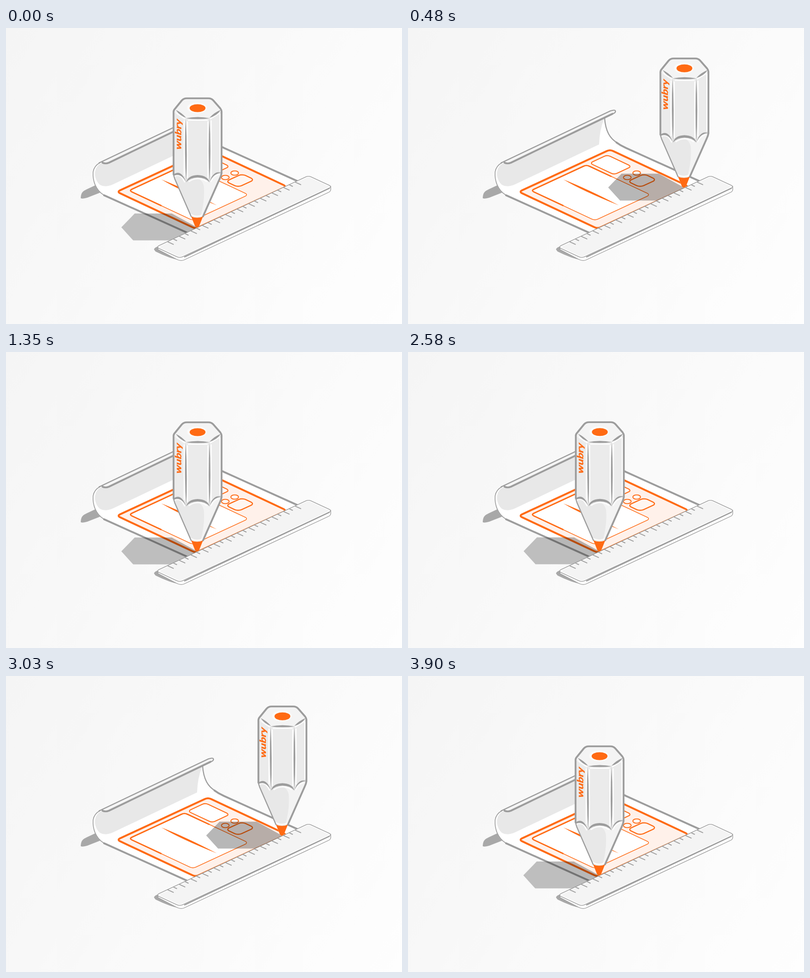
These frames come from a looping animation (800 by 600 pixels, 4.35 s). An HTML page:

```html
<!DOCTYPE html>
<html lang="en">
<head>
<meta charset="utf-8">
<title>Pencil and ruler</title>
<style>
  html, body { margin: 0; height: 100%; overflow: hidden; }
  body { background: linear-gradient(120deg, #f5f5f5, #fefefe); }
  svg { display: block; width: 100%; height: 100%; }
  .line { fill: none; stroke: #9c9c9c; stroke-linecap: round; stroke-linejoin: round; }
  .ink { fill: none; stroke: #ff6a13; stroke-linejoin: round; }
  .white { fill: none; stroke: #fff; stroke-linecap: round; stroke-linejoin: round; }
  .dark { fill: #9c9c9c; }
  .orange { fill: #ff6a13; }
  .ink path, rect { vector-effect: non-scaling-stroke; }
  text { font: italic 700 23px Lato, "Open Sans", sans-serif; stroke: #ff6a13; stroke-width: .5; }
</style>
</head>
<body>
<svg viewBox="0 0 800 600">
  <defs>
    <path id="sheet" d="M397 181C399 215 416 231 440 243L588 310L366 415L198 339C180 330 175 308 176 292Q178 279 192 272Z"/>
    <clipPath id="onSheet"><use href="#sheet"/></clipPath>
    <path id="shadow" d="M260 376H335L386 404L360 430.500H257L233 404Z"/>
  </defs>

  <g id="paper">
    <path fill="#a8a8a8" d="M151 344C152 333 155 331 163 327L180 319Q186 329 192 333L164 344Q154 347 151 345Z"/>
    <use href="#sheet" fill="#fff"/>
    <path fill="#e8e8e8" d="M205 276L396 184Q387 207 386 236L216 317Q200 324 190 318C177 308 175 281 193 274Z"/>
    <path fill="#f5f5f5" d="M186 274L409 168Q418 165 419 168Q420 172 413 174L209 273Q200 277 193 273Z"/>
    <path class="line" stroke-width="1.500" d="M198 339C180 328 175 308 176 292Q178 279 190 273"/>
    <path class="line" stroke-width="2.200" d="M188 273.500L409 168Q418 165 419 168Q420 172 413 174"/>
    <path class="line" stroke-width="3.700" d="M413 174L208 273Q201 276 195 273"/>
    <path class="line" stroke-width="3.600" d="M198 339L366 415M421 232Q429 238 440 243L588 310"/>
    <path class="line" stroke-width="2.200" d="M397 181C399 210 408 224 423 233"/>
    <g class="ink" transform="matrix(1 .47 1 -.465 224 332)">
      <rect width="159" height="184" rx="6" fill="#fff1ea" stroke-width="3.800"/>
      <rect x="9.500" y="15" width="129" height="112" rx="6" fill="#fff" stroke-width="1.400"/>
      <path d="M75 15H15.500Q9.500 15 9.500 21V121Q9.500 127 15.500 127H60" stroke-width="2.600"/>
      <rect x="9" y="134" width="49.500" height="35.500" rx="6" fill="#fff" stroke-width="1.900"/>
      <rect x="87" y="133" width="25" height="33" rx="7" fill="#fff6f1" stroke-width="2.200"/>
    </g>
    <g class="ink" stroke-width="1.800">
      <ellipse cx="462" cy="294" rx="7.800" ry="4.400" fill="#fff6f1"/>
      <ellipse cx="443" cy="303" rx="7.800" ry="4.400" fill="#fff6f1"/>
    </g>
    <path class="orange" d="M314 307Q364 327 426 359.500Q352 330 314 307Z"/>
  </g>

  <use class="moving" href="#shadow" fill-opacity=".24"/>
  <g clip-path="url(#onSheet)">
    <use class="moving" href="#shadow" fill-opacity=".06"/>
  </g>

  <g id="ruler">
    <path fill="#a8a8a8" d="M299 449Q299 446 306 443L352 471Q330 467 302 453Z"/>
    <path class="line" style="fill:#fff" stroke-width="1.300" d="M307 444V449L345 469Q353 473 360 470L652 333Q656 331 656 327V321L600 310Z"/>
    <g transform="matrix(1 .47 1 -.47 303 444)">
      <rect width="48" height="308" rx="6" fill="#fff" stroke="#9c9c9c" stroke-width="1.400"/>
      <rect x="2.500" y="2.500" width="43" height="303" rx="5" fill="#f4f4f4"/>
    </g>
    <path class="line" stroke-width="2.300" d="M361 464L653 325"/>
    <path class="line" stroke-width="1.900" id="ticks"/>
  </g>

  <g class="moving">
    <path fill="#f3f3f3" d="M338 168L355 147Q359 142 365 142H409Q415 142 419 147L436 168V298L398 382L390 402Q386 407 382 402L374 382L338 299Z"/>
    <path fill="#e8e8e8" d="M340 303Q352 295 364 313Q372 304 386 304Q400 310 400 326C401 348 397 367 393 383H374Z"/>
    <path class="white" stroke-width="2" d="M373 378Q386 385 399 378"/>
    <path fill="#ebebeb" d="M340 171L363 184V310Q354 290 340 296ZM364 184H411V311Q387 290 364 311ZM411 184L434 170V293Q419 291 411 311Z"/>
    <path fill="#f4f4f4" d="M342 167L358 147Q361 144 366 144H408Q413 144 416 147L433 167L411 182H364Z"/>
    <path class="white" stroke-width="2.200" d="M345 173L361 184M368 187H407M413 184L431 173M366.500 190V303M408 190V303M414.500 188V300M432.500 174V289M360 188V299M343 298Q352 294 361 312M370 311Q387 300 405 311M414 311Q420 299 430 297"/>
    <path class="dark" d="M343 166Q354 171 364 182Q351 178 343 166ZM434 166Q421 171 411 182Q426 178 434 166ZM363 183Q387 178 412 183Q387 186 363 183Z"/>
    <path class="dark" d="M363 183Q367 247 364 313Q360 247 363 183ZM411 183Q415 247 411 313Q408 247 411 183Z"/>
    <path class="dark" d="M364 313Q367 299 387 298Q408 299 411 313Q403 303 387 303Q372 303 364 313ZM338 297Q354 285 364 313Q353 292 338 300ZM411 313Q419 287 436 294Q420 293 411 313Z"/>
    <ellipse cx="386" cy="162" rx="20" ry="11" fill="#fbfbfb"/>
    <ellipse class="orange" cx="387" cy="162.500" rx="16" ry="8"/>
    <path class="line" stroke-width="3.600" d="M338.500 297V171Q338 167 342 163L355 147Q359 142.500 365 142.500H409Q415 142.500 419 147L433 163Q436 167 435.500 171V294Q435 299 432 305L398 382"/>
    <path class="line" stroke-width="2.200" d="M338.500 296Q339 301 341 306L374 382"/>
    <path class="orange" d="M374 382Q386 387 398 382L390 402Q386 407 382 402Z"/>
    <text class="orange" transform="matrix(0 -1 .75 .12 353.500 247)">wubry</text>
  </g>
</svg>
<script>
  const LOOP = 4350, STEP = 30, MOVE = 600;
  const moving = document.querySelectorAll(".moving");

  let ticks = "";
  for (let i = 0; i <= 22; i++) {
    const x = 327 + i * 11.7, y = 433.5 - i * 5.5;
    ticks += `M${x} ${y}l${i % 2 ? "6 2.8" : "11 5"}`;
  }
  document.getElementById("ticks").setAttribute("d", ticks);

  const bezier = (s, a, b) => 3 * a * s * (1 - s) ** 2 + 3 * b * s * s * (1 - s) + s ** 3;

  // cubic-bezier(.55, 0, .45, 1), solved by bisection
  function ease(x) {
    if (x <= 0) return 0;
    if (x >= 1) return 1;
    let lo = 0, hi = 1;
    for (let i = 0; i < 24; i++) {
      const mid = (lo + hi) / 2;
      if (bezier(mid, .55, .45) < x) lo = mid; else hi = mid;
    }
    return bezier(lo, 0, 1);
  }

  function draw(ms) {
    const t = Math.floor(ms % LOOP / STEP) * STEP;
    const local = t < 2550 ? t : t - 2550;
    const p = ease(local / MOVE) - ease((local - 750) / MOVE);
    const shift = `translate(${181.5 * p} ${-85.5 * p})`;
    for (const part of moving) part.setAttribute("transform", shift);
  }

  let start;
  function tick(now) {
    start ??= now;
    draw(now - start);
    requestAnimationFrame(tick);
  }
  draw(0);
  requestAnimationFrame(tick);
</script>
</body>
</html>
```
